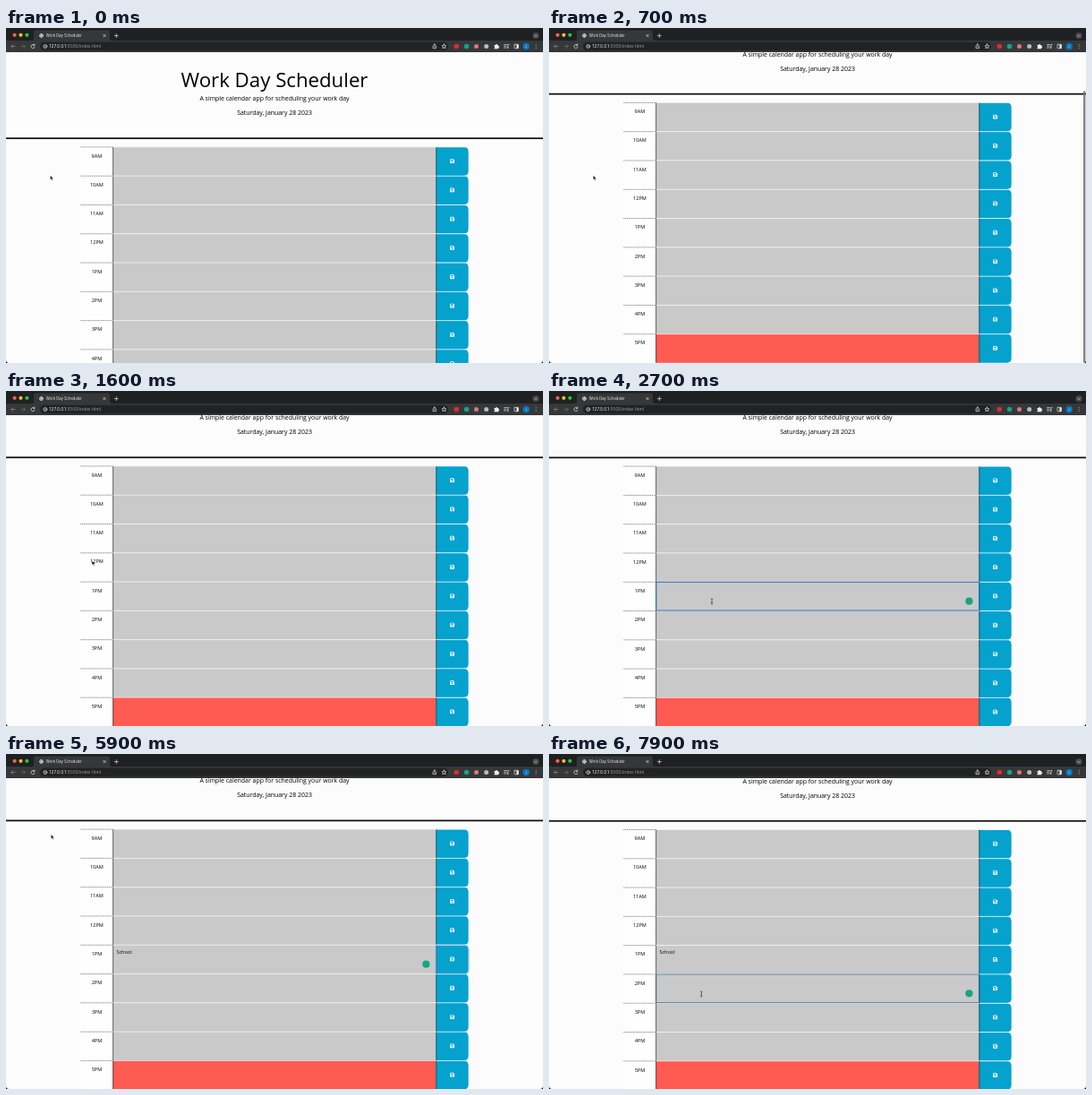
Recreate the animation shown at these times as an HTML page. Size 600 px wide and 374 px high, loop 8 s.

```html
<!DOCTYPE html>
<html lang="en">
<head>
<meta charset="utf-8">
<title>Work Day Scheduler</title>
<style>
  html, body { margin: 0; width: 100%; height: 100%; overflow: hidden; background: #000; }
  svg { display: block; width: 100vw; height: 100vh; }
  text { white-space: pre; }
  .page { font: 5.56px "Open Sans", sans-serif; fill: #000; }
  .mid { text-anchor: middle; }
  .title { font-size: 22.22px; }
  .lead { font-size: 6.94px; }
  .ui { font: 4.86px Inter, sans-serif; fill: #e8eaed; }
  .line { fill: none; stroke: #dfe1e5; stroke-width: .7; stroke-linecap: round; stroke-linejoin: round; }
</style>
</head>
<body>
<svg viewBox="0 0 600 374">
  <defs>
    <clipPath id="window"><path d="M0 26H600V370.5Q600 374 596.5 374H3.5Q0 374 0 370.5Z"/></clipPath>
    <g id="disk">
      <path fill="#fff" fill-rule="evenodd" d="M-1.8-2.4H1.2L2.4-1.2V1.8Q2.4 2.4 1.8 2.4H-1.8Q-2.4 2.4-2.4 1.8V-1.8Q-2.4-2.4-1.8-2.4Z
        M-1.7-1.7V-.4H.9V-1.7Z M0 .1A.75.75 0 1 0 .01 .1Z"/>
    </g>
  </defs>

  <g clip-path="url(#window)">
    <rect y="26" width="600" height="348" fill="#fcfcfc"/>
    <g id="page" class="page">
      <text class="mid title" x="300" y="66">Work Day Scheduler</text>
      <text class="mid lead" x="300" y="81">A simple calendar app for scheduling your work day</text>
      <text class="mid lead" x="300" y="97.1">Saturday, January 28 2023</text>
      <rect y="122.3" width="600" height="1.75" fill="#111"/>
      <g id="rows"></g>
      <text id="entry" x="123.4"></text>
      <rect id="caret" width=".45" height="6.6"/>
      <rect id="focus" x="119.7" width="361" height="31.7" fill="none"/>
      <path id="ring" fill="none" stroke="#9fb4e6" stroke-width=".8"/>
      <circle id="badge" cx="469.4" r="4.1" fill="#12a682"/>
    </g>
    <rect id="thumb" x="597" width="2.4" height="303" rx="1.2" fill="#777"/>
  </g>

  <g id="chrome">
    <rect width="600" height="27" fill="#1f2022"/>
    <path fill="#363739" d="M0 14H29Q31 14 31 12V5Q31 2.6 33.5 2.6H113.500Q116 2.6 116 5V12Q116 14 118 14H600V27H0Z"/>
    <rect x="38" y="15.7" width="456" height="9.6" rx="4.8" fill="#212224"/>
    <circle cx="9.600" cy="7.800" r="2.1" fill="#fe5f57"/>
    <circle cx="16.500" cy="7.800" r="2.1" fill="#febc2e"/>
    <circle cx="23.400" cy="7.800" r="2.1" fill="#28c840"/>
    <g class="line" stroke-width=".5">
      <circle cx="39.5" cy="8.500" r="2"/>
      <path d="M37.600 8.500H41.400M39.500 6.500Q38.200 8.500 39.500 10.500Q40.800 8.500 39.500 6.500"/>
    </g>
    <text class="ui" x="44.7" y="10" style="font-size:4.17px">Work Day Scheduler</text>
    <path class="line" d="M108.800 7.300L111.200 9.700M111.200 7.300L108.800 9.700M121.300 8.600H125.300M123.300 6.600V10.600"/>
    <circle cx="592" cy="8.700" r="3.600" fill="#46484b"/>
    <path class="line" d="M590.600 8.200L592 9.500L593.400 8.200"/>
    <path class="line" d="M10.200 20.500H5.900M7.900 18.500L5.900 20.500L7.900 22.500" opacity=".5"/>
    <path class="line" d="M17 20.500H21.300M19.300 18.500L21.300 20.500L19.300 22.500" opacity=".3"/>
    <path class="line" d="M31.500 19A2.100 2.100 0 1 0 32.100 21M31.900 17.800V19.400H30.300"/>
    <circle class="line" cx="43.800" cy="20.500" r="2"/>
    <path class="line" d="M43.800 20.400V21.500M43.800 19.400V19.450"/>
    <text class="ui" x="48.6" y="22.2">127.0.0.1<tspan fill="#969a9f">:5500/index.html</tspan></text>
    <path class="line" d="M477 20V22.700H480.600V20M478.800 21.300V17.900M477.700 18.900L478.800 17.900L479.900 18.900"/>
    <path class="line" d="M489.500 17.900L490.200 19.700L492 19.800L490.600 21L491.100 22.800L489.500 21.800L487.900 22.800L488.400 21L487 19.800L488.800 19.700Z"/>
    <circle cx="503.300" cy="20.500" r="2.800" fill="#d92c35"/>
    <circle cx="514.600" cy="20.500" r="2.800" fill="#12a682"/>
    <circle cx="525.500" cy="20.500" r="2.500" fill="#d9797b"/>
    <circle cx="536.700" cy="20.500" r="2.500" fill="#b9bbbd"/>
    <path fill="#eceef0" d="M545.500 19H547A1 1 0 0 1 549 19H550.200V20.200A1 1 0 0 1 550.200 22.200V23.200H545.500V21.900A.7.7 0 0 0 545.500 20.400Z"/>
    <path class="line" d="M556.600 18.600H560M556.600 20.300H559M556.600 22H558.300M561 22V18.600H562.200"/>
    <circle cx="560.400" cy="22" r=".8" fill="#e8eaed"/>
    <rect class="line" x="568" y="18.300" width="4.500" height="4.500" rx=".5"/>
    <rect x="570.400" y="18.300" width="2.100" height="4.500" fill="#e8eaed"/>
    <circle cx="581.200" cy="20.500" r="3.700" fill="#0878c4"/>
    <text class="ui mid" x="581.2" y="21.900" style="font-size:3.8px">J</text>
    <path class="line" d="M592.200 18.500V18.550M592.200 20.500V20.550M592.200 22.500V22.550" stroke-width="1"/>
  </g>

  <g id="pointer">
    <path id="arrow" d="M0 0V4.900L1.200 3.900L2 5.700L2.900 5.300L2.100 3.600H3.600Z" fill="#000" stroke="#fff" stroke-width=".45"/>
    <path id="beam" d="M-1.100-3Q0-3 0-2.200Q0-3 1.100-3M0-2.200V2.200M-1.100 3Q0 3 0 2.200Q0 3 1.100 3M-.6 .8H.6" fill="none" stroke="#222" stroke-width=".6"/>
    <path id="hand" d="M-.6-2.500Q0-3.100.6-2.500V-.4L2.300 0Q2.800.3 2.600 1.300L2 3.200H-.8L-2.300 1Q-2.200.2-1.400.5L-.6 1.200Z" fill="#fff" stroke="#111" stroke-width=".5"/>
  </g>
</svg>

<script>
const LOOP = 8000, STEP = 100;
const TOP = 132.7, PITCH = 32.29;
const LEFT = 83.33, FIELD = 119.44, BUTTON = 480.55, RIGHT = 516.67;
const HOURS = ['9AM', '10AM', '11AM', '12PM', '1PM', '2PM', '3PM', '4PM', '5PM'];
const $ = id => document.getElementById(id);
const rowY = i => TOP + i * PITCH;

// Button outline: square on the left, rounded on the right.
const buttonPath = (y, h = PITCH, grow = 0) => {
  const r = 5.2, x = BUTTON - grow, end = RIGHT + grow;
  return `M${x} ${y - grow}H${end - r}q${r} 0 ${r} ${r}V${y + h + grow - r}q0 ${r} ${-r} ${r}H${x}Z`;
};

$('rows').innerHTML = HOURS.map((hour, i) => {
  const y = rowY(i);
  const fill = i < 8 ? '#c9c9c9' : '#fe5b53';
  return `<rect x="${LEFT}" y="${y}" width="${FIELD - LEFT}" height="${PITCH}" fill="#fefefe"/>
    <rect x="${FIELD}" y="${y}" width="${BUTTON - FIELD}" height="${PITCH}" fill="${fill}"/>
    <path d="${buttonPath(y + .35, PITCH - .35)}" fill="#05a2ce"/>
    <path d="M${FIELD} ${y + .2}H${RIGHT - 3}" stroke="#fff" stroke-width=".6"/>
    <path d="M${LEFT} ${y + .2}H${FIELD}" stroke="#222" stroke-width=".55" stroke-dasharray="1.05 .7"/>
    <path d="M${FIELD + .2} ${y + .4}v${PITCH - .4}M${BUTTON + .2} ${y + .4}v${PITCH - .4}" stroke="#111" stroke-width=".6"/>
    <text class="mid" x="101.4" y="${y + 11.9}">${hour}</text>
    <use href="#disk" x="498.6" y="${y + 15.9}"/>`;
}).join('');

const SCROLL = [[200, 0], [300, 22], [400, 49.4], [500, 49.5], [1200, 49.5], [1800, 48.8], [6800, 48.8], [7400, 48.4]];
const THUMB = [[200, 0], [300, .9], [900, .9], [1000, .5], [1100, .12], [1200, 0]];
const POINTER = [
  [1200, 49.4, 164.6], [2200, 182, 235], [4100, 182, 235], [4300, 353, 258], [4900, 498, 231],
  [5100, 498, 231], [5800, 50.3, 89.8], [5900, 50.3, 89.8], [6500, 29.5, 20], [6800, 29.5, 20], [7400, 170.3, 268]
];
const TYPED = [2800, 3000, 3200, 3400, 3600, 3800];
const WORD = 'School';

// Eased values between the rows of a [time, ...values] table.
function sample(table, t) {
  const next = table.findIndex(row => row[0] > t);
  if (next === 0) return table[0].slice(1);
  if (next < 0) return table[table.length - 1].slice(1);
  const a = table[next - 1], b = table[next];
  const p = (t - a[0]) / (b[0] - a[0]);
  const ease = p * p * (3 - 2 * p);
  return a.slice(1).map((v, i) => v + (b[i + 1] - v) * ease);
}

const show = (id, on) => $(id).setAttribute('visibility', on ? 'visible' : 'hidden');
const set = (id, attrs) => { for (const k in attrs) $(id).setAttribute(k, attrs[k]); };
const within = (t, from, to) => t >= from && t < to;

$('entry').setAttribute('y', rowY(4) + 9.9);
$('ring').setAttribute('d', buttonPath(rowY(4) + .3, PITCH - .3, .5));

function draw(t) {
  const [scroll] = sample(SCROLL, t);
  set('page', { transform: `translate(0 ${-scroll})` });
  set('thumb', { y: 27 + scroll * .876, opacity: sample(THUMB, t)[0] });

  const typed = WORD.slice(0, TYPED.filter(at => at <= t).length);
  if ($('entry').textContent !== typed) $('entry').textContent = typed;

  const second = t >= 7400;
  const row = rowY(second ? 5 : 4);
  set('caret', { x: 123.4 + (second ? 0 : $('entry').getComputedTextLength()), y: row + 4.4 });
  show('caret', within(t, 2800, 4200) || within(t, 7400, 7800));
  set('focus', { y: row + .3, stroke: second ? '#27577c' : '#2470bd', 'stroke-width': second ? .7 : 1 });
  show('focus', within(t, 2400, 5000) || second);
  set('badge', { cy: row + 21.6 });
  show('badge', within(t, 2600, 6700) || t >= 7800);
  show('ring', within(t, 5000, 6700));

  const [x, y] = sample(POINTER, t);
  const inRows = y > 27 && y > TOP - scroll;
  const kind = inRows && x > BUTTON && x < RIGHT ? 'hand' : inRows && x > FIELD && x < BUTTON ? 'beam' : 'arrow';
  const visible = !within(t, 2800, 4100);
  set('pointer', { transform: `translate(${x} ${y})` });
  for (const id of ['arrow', 'beam', 'hand']) show(id, visible && id === kind);
}

function tick() {
  const t = performance.now() % LOOP;
  draw(Math.floor(t / STEP) * STEP);
  requestAnimationFrame(tick);
}
tick();
</script>
</body>
</html>
```
